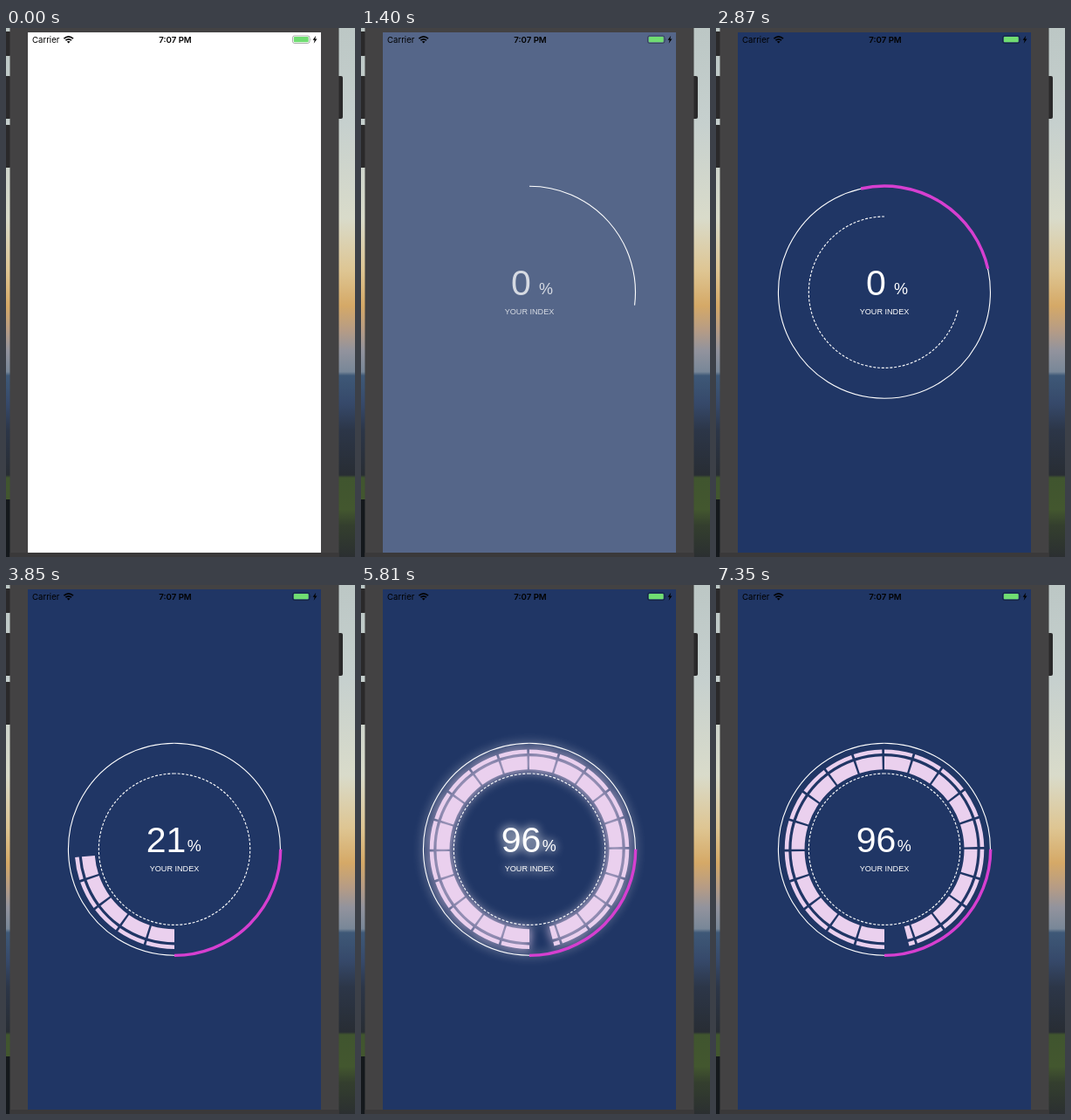
Write an HTML page that moves like this. It is 400 px wide and 606 px high and loops after 7420 ms.

```html
<!DOCTYPE html>
<html lang="en">
<head>
<meta charset="utf-8">
<title>Index gauge</title>
<style>
  html, body { margin: 0; width: 100%; height: 100%; overflow: hidden; background: #434243; }
  svg { display: block; width: 100%; height: 100%; }
  .status { font: 9.6px Inter, Roboto, sans-serif; fill: #000; }
  .gauge { font-family: "Liberation Sans", Arial, sans-serif; fill: #fff; }
</style>
</head>
<body>
<svg viewBox="0 0 400 606">
  <defs>
    <linearGradient id="sky" x1="0" y1="0" x2="0" y2="606" gradientUnits="userSpaceOnUse">
      <stop offset="0" stop-color="#bcc7c5"/>
      <stop offset=".18" stop-color="#c6d0ce"/>
      <stop offset=".36" stop-color="#d9dbca"/>
      <stop offset=".46" stop-color="#dec592"/>
      <stop offset=".525" stop-color="#d5a967"/>
      <stop offset=".57" stop-color="#b79c84"/>
      <stop offset=".61" stop-color="#92939d"/>
      <stop offset=".65" stop-color="#788798"/>
      <stop offset=".657" stop-color="#3e5877"/>
      <stop offset=".71" stop-color="#36496a"/>
      <stop offset=".76" stop-color="#2c3648"/>
      <stop offset=".845" stop-color="#282d34"/>
      <stop offset=".85" stop-color="#40552f"/>
      <stop offset=".91" stop-color="#43572f"/>
      <stop offset=".94" stop-color="#343f2e"/>
      <stop offset="1" stop-color="#2b2f31"/>
    </linearGradient>
    <filter id="blur" x="40" y="150" width="306" height="306" filterUnits="userSpaceOnUse">
      <feGaussianBlur stdDeviation="5.5" result="b"/>
      <feMerge><feMergeNode in="b"/><feMergeNode in="b"/></feMerge>
    </filter>
  </defs>

  <rect width="400" height="606" fill="url(#sky)"/>
  <rect y="540" width="5" height="66" fill="#14181c"/>
  <g fill="#2a292a">
    <rect x="-4" y="4" width="10" height="28" rx="2"/>
    <rect x="-4" y="55" width="10" height="49" rx="2"/>
    <rect x="-4" y="111" width="10" height="49" rx="2"/>
    <rect x="379" y="55" width="7" height="49" rx="2"/>
  </g>
  <rect x="4.5" width="377" height="606" fill="#434243"/>
  <rect x="4.5" y="601" width="377" height="5" fill="#3a393a"/>
  <rect x="25" y="5" width="336" height="596" fill="#fff"/>
  <rect id="screen" x="25" y="5" width="336" height="596" fill="#203665"/>

  <g class="status">
    <text x="30" y="17">Carrier</text>
    <text x="194" y="17" text-anchor="middle" font-weight="600">7:07 PM</text>
    <g fill="none" stroke="#000" stroke-width="1.7">
      <path d="M66.4 12.2Q71.7 7.4 77 12.2"/>
      <path d="M68.4 14.2Q71.7 11.4 75 14.2"/>
    </g>
    <path d="M69.8 15.6Q71.7 14.2 73.6 15.6L71.7 17.6Z"/>
    <rect x="328.5" y="8.9" width="19.5" height="8.6" rx="2.2" fill="none" stroke="#000" stroke-opacity=".4" stroke-width=".8"/>
    <path d="M348.9 11.8q1.2 1.4 0 2.8z" fill-opacity=".4"/>
    <rect x="329.8" y="10.1" width="16.9" height="6.2" rx="1" fill="#70dd72"/>
    <path d="M355.2 8.8L351.6 13.7H353.7L352.7 17.8L356.5 12.5H354.3Z"/>
  </g>

  <use id="glow" href="#white" filter="url(#blur)"/>
  <g id="white" class="gauge">
    <g fill="none">
      <path id="ring" stroke="#fff" stroke-width="1.1"/>
      <path id="dashes" stroke="#fff" stroke-width="1.1" stroke-dasharray="3 1.8"/>
      <path id="inner" stroke="#ead0ee" stroke-width="15"/>
      <path id="outer" stroke="#ead0ee" stroke-width="4.6"/>
    </g>
    <g id="label">
      <text id="num" y="306" x="183.5" font-size="41" text-anchor="middle">0</text>
      <text id="pct" y="305" font-size="18">%</text>
      <text x="193" y="327.6" font-size="9.1" text-anchor="middle">YOUR INDEX</text>
    </g>
  </g>
  <path id="pink" fill="none" stroke="#d63fd0"/>
</svg>

<script>
const LOOP = 7420, CX = 193, CY = 302.7, TARGET = 96;
const $ = id => document.getElementById(id);
const set = (id, attrs) => { for (const k in attrs) $(id).setAttribute(k, attrs[k]); };

const ramp = (t, start, length) => Math.min(1, Math.max(0, (t - start) / length));
const ease = p => p * p * (3 - 2 * p);

// Angles are degrees, clockwise from the top.
function point(r, a) {
  const q = a * Math.PI / 180;
  return (CX + r * Math.sin(q)).toFixed(2) + ' ' + (CY - r * Math.cos(q)).toFixed(2);
}
function arc(r, a, b) {
  const span = b - a;
  if (Math.abs(span) < 0.01) return '';
  if (Math.abs(span) >= 359.9) b = a + Math.sign(span) * 359.95;
  return `M${point(r, a)}A${r} ${r} 0 ${+(Math.abs(span) > 180)} ${+(span > 0)} ${point(r, b)}`;
}
function blocks(r, sweep) {
  let d = '';
  for (let a = 0; a < sweep; a += 18) d += arc(r, 180 + a, 180 + Math.min(a + 16.6, sweep));
  return d;
}

function draw(t) {
  const fade = ease(ramp(t, 1190, 310));
  const spin = ramp(t, 1747, 1573);
  const fill = ramp(t, 3320, 2150) * 3.6 * TARGET;
  const count = Math.floor(ramp(t, 3320, 2380) * TARGET);
  const pulse = t > 5460 && t < 7340 ? (1 - Math.cos((t - 5460) / 940 * 2 * Math.PI)) / 2 : 0;

  set('screen', { opacity: fade });
  set('label', { opacity: fade });
  set('ring', { d: arc(121.5, 0, 360 * ease(ramp(t, 1210, 560))) });
  set('dashes', { d: arc(86.7, 0, -360 * spin) });
  set('inner', { d: blocks(99, fill) });
  set('outer', { d: blocks(112, fill) });

  $('num').textContent = count;
  set('pct', { x: count < 10 ? 204 : 207.7 });

  const grow = ramp(t, 1747, 500), start = 90 + 360 * spin;
  set('pink', {
    d: arc(121.7, start, start + 90),
    'stroke-width': 1 + 2.4 * grow,
    opacity: ramp(t, 1747, 240)
  });
  set('glow', { opacity: 0.75 * pulse, display: pulse ? 'inline' : 'none' });
}

const begin = performance.now();
function tick() {
  draw((performance.now() - begin) % LOOP);
  requestAnimationFrame(tick);
}
tick();
</script>
</body>
</html>
```
